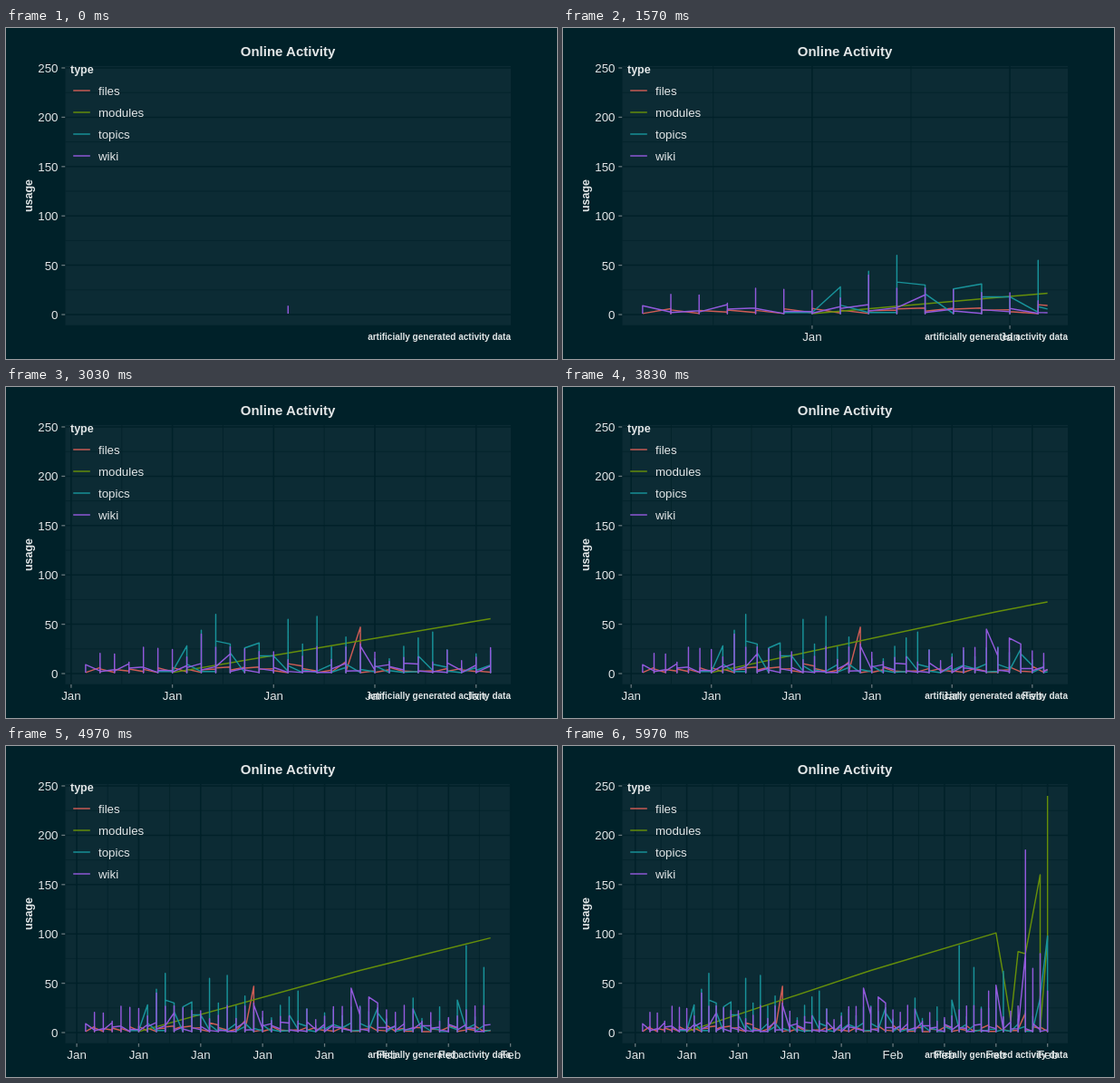
Write an HTML page that moves like this. It is 608 px wide and 365 px high and loops after 10 s.

```html
<!DOCTYPE html>
<html lang="en">
<head>
<meta charset="utf-8">
<title>Online Activity</title>
<style>
  html, body { margin: 0; width: 100%; height: 100%; overflow: hidden; background: #002129; }
  svg { display: block; width: 608px; height: 365px; }
  text { font-family: "Liberation Sans", Arial, sans-serif; font-size: 13.3px; fill: #e2e6e7; }
  .bold { font-weight: bold; }
  .mid { text-anchor: middle; }
  .end { text-anchor: end; }
  .title { font-size: 15px; }
  .name { font-size: 12.5px; }
  .note { font-size: 10px; }
  .grid { stroke: #012129; stroke-width: 1.5; }
  .minor { stroke: #012129; stroke-width: .7; }
  .tick { stroke: #68777c; stroke-width: 1.3; }
  .line { fill: none; stroke-width: 1.45; stroke-linejoin: round; }
</style>
</head>
<body>
<svg viewBox="0 0 608 365">
  <rect x="65.5" y="42" width="491.5" height="285.7" fill="#0c2b34"/>
  <g id="rows"></g>
  <g id="weeks"></g>
  <g id="lines"></g>
  <text class="bold mid title" x="311" y="31">Online Activity</text>
  <text class="bold mid name" transform="translate(29 185) rotate(-90)">usage</text>
  <text class="bold name" x="71" y="50">type</text>
  <g id="legend"></g>
  <text class="bold end note" x="557" y="344">artificially generated activity data</text>
</svg>
<script>
const LEFT = 65.5, WIDTH = 491.5, RIGHT = LEFT + WIDTH, TOP = 42, BOTTOM = 327.7;
const DAYS = 55, LAST = 179, LOOP = 10000, STEP = 1000 / 30;
const byId = id => document.getElementById(id);
const yOf = v => 316 - 1.088 * v;

function add(parent, tag, attrs, text) {
  const el = document.createElementNS("http://www.w3.org/2000/svg", tag);
  for (const name in attrs) el.setAttribute(name, attrs[name]);
  if (text !== undefined) el.textContent = text;
  parent.appendChild(el);
  return el;
}
const rule = (parent, cls, x1, y1, x2, y2) =>
  add(parent, "line", { class: cls, x1, y1, x2, y2 });

function seeded(seed) {
  return () => (seed = seed * 16807 % 2147483647) / 2147483647;
}

// Each day the line arrives, sweeps from low to a peak and leaves.
// Notable days are [day, peak, arrive, leave]; the rest is light noise.
function daily({ seed, from, quiet, base, spread, sway, notable }) {
  const rand = seeded(seed), points = [];
  for (let day = from; day <= DAYS; day++) {
    const [a, b, c] = [rand(), rand(), rand()];
    const calm = day < quiet;
    const set = notable.find(n => n[0] === day) || [];
    const arrive = set[2] ?? (calm ? 2 : 1 + sway * a * a);
    const leave = set[3] ?? (calm ? 2 : 1 + sway * b * b);
    const peak = set[1] ?? (calm ? 2 : base + spread * c);
    for (const v of [arrive, 1, Math.max(peak, arrive, leave), leave]) points.push([day, v]);
  }
  return points;
}

const files = daily({
  seed: 4127, from: 0, quiet: 0, base: 1, spread: 2, sway: 7,
  notable: [[0, 1, 1, 1], [14, 10, 1, 10], [18, 12, 12, 2], [19, 47, 47, 1], [52, 20, 20, 2]]
});

const modules = [[6, 1], [31, 63], [48, 101], [49, 58], [50, 12], [51, 82],
  [52, 80], [54, 160], [54, 3], [55, 95], [55, 240]];

const topics = daily({
  seed: 9043, from: 5, quiet: 7, base: 6, spread: 22, sway: 9,
  notable: [[7, 28, 28], [8, 44, 2, 2], [9, 60, 2, 33], [10, 30, 30, 21], [11, 26, 1, 26],
    [12, 31, 31, 18], [13, 18, 18, 18], [14, 55], [15, 30], [16, 58], [18, 37],
    [23, 36, 2, 18], [24, 42], [33, 25, 25, 20], [37, 35, 3, 24], [42, 33, 3, 33],
    [43, 88], [45, 66], [48, 42], [49, 62], [54, 36, 35, 36], [55, 98, 98]]
});

const wiki = daily({
  seed: 2711, from: 0, quiet: 0, base: 9, spread: 19, sway: 10,
  notable: [[0, 9, 1, 9], [8, 40], [10, 27, 20], [19, 30, 3, 28], [30, 45, 2, 45],
    [31, 26, 18], [32, 36, 2, 36], [33, 30, 30], [47, 42], [48, 48, 4, 48],
    [52, 185, 80], [53, 65], [54, 80], [55, 42]]
});

const series = [
  { name: "files", color: "#cf5c55", points: files },
  { name: "modules", color: "#668f0a", points: modules },
  { name: "topics", color: "#18939a", points: topics },
  { name: "wiki", color: "#9259dc", points: wiki }
];

series.forEach((s, i) => {
  const y = 69 + 24 * i;
  s.path = add(byId("lines"), "path", { class: "line", stroke: s.color });
  add(byId("legend"), "path", { class: "line", stroke: s.color, d: `M74.2 ${y}H92.8` });
  add(byId("legend"), "text", { x: 102, y: y + 5 }, s.name);
});

for (let v = 0; v <= 250; v += 25) {
  const y = yOf(v), major = v % 50 === 0;
  rule(byId("rows"), major ? "grid" : "minor", LEFT, y, RIGHT, y);
  if (!major) continue;
  rule(byId("rows"), "tick", LEFT - 4.2, y, LEFT - .3, y);
  add(byId("rows"), "text", { class: "end", x: 57.5, y: y + 5 }, v);
}

// Weekly breaks start the day before the data does.
const weeks = Array.from({ length: 9 }, (_, i) => {
  const g = add(byId("weeks"), "g", {});
  rule(g, "grid", 0, TOP, 0, BOTTOM);
  rule(g, "tick", 0, BOTTOM + .3, 0, BOTTOM + 4);
  add(g, "text", { class: "mid", x: 0, y: 345 }, i < 5 ? "Jan" : "Feb");
  const half = rule(byId("weeks"), "minor", 0, TOP, 0, BOTTOM);
  return { day: 7 * i - 1, g, half };
});

// Every day lands on a whole step, so days last three or four steps.
const stepOf = day => Math.round(day * LAST / DAYS);
function dayAt(step) {
  let day = 0;
  while (day < DAYS && stepOf(day + 1) <= step) day++;
  if (day === DAYS) return DAYS;
  return day + (step - stepOf(day)) / (stepOf(day + 1) - stepOf(day));
}

function revealed(points, now) {
  const next = points.findIndex(p => p[0] > now);
  if (next < 0) return points;
  const out = points.slice(0, next);
  if (next > 0) {
    const [d0, v0] = points[next - 1], [d1, v1] = points[next];
    if (now > d0) out.push([now, v0 + (v1 - v0) * (now - d0) / (d1 - d0)]);
  }
  return out;
}

function place(el, x) {
  const inside = x >= LEFT && x <= RIGHT;
  el.setAttribute("visibility", inside ? "visible" : "hidden");
  if (inside) el.setAttribute("transform", `translate(${x.toFixed(2)} 0)`);
}

function draw(step) {
  const now = dayAt(step);
  const span = WIDTH / 1.1;
  const xOf = day => now ? LEFT + span * (.05 + day / now)
                         : day ? -1000 : LEFT + WIDTH / 2;
  for (const w of weeks) {
    place(w.g, xOf(w.day));
    place(w.half, xOf(w.day + 3.5));
  }
  for (const s of series) {
    const pts = revealed(s.points, now);
    s.path.setAttribute("d", pts.map(([d, v], i) =>
      (i ? "L" : "M") + xOf(d).toFixed(2) + " " + yOf(v).toFixed(2)).join(""));
  }
}

const start = performance.now();
let shown = -1;
function tick() {
  const t = (performance.now() - start) % LOOP;
  const step = Math.min(LAST, Math.floor((t + 4) / STEP));
  if (step !== shown) draw(shown = step);
  requestAnimationFrame(tick);
}
tick();
</script>
</body>
</html>
```
